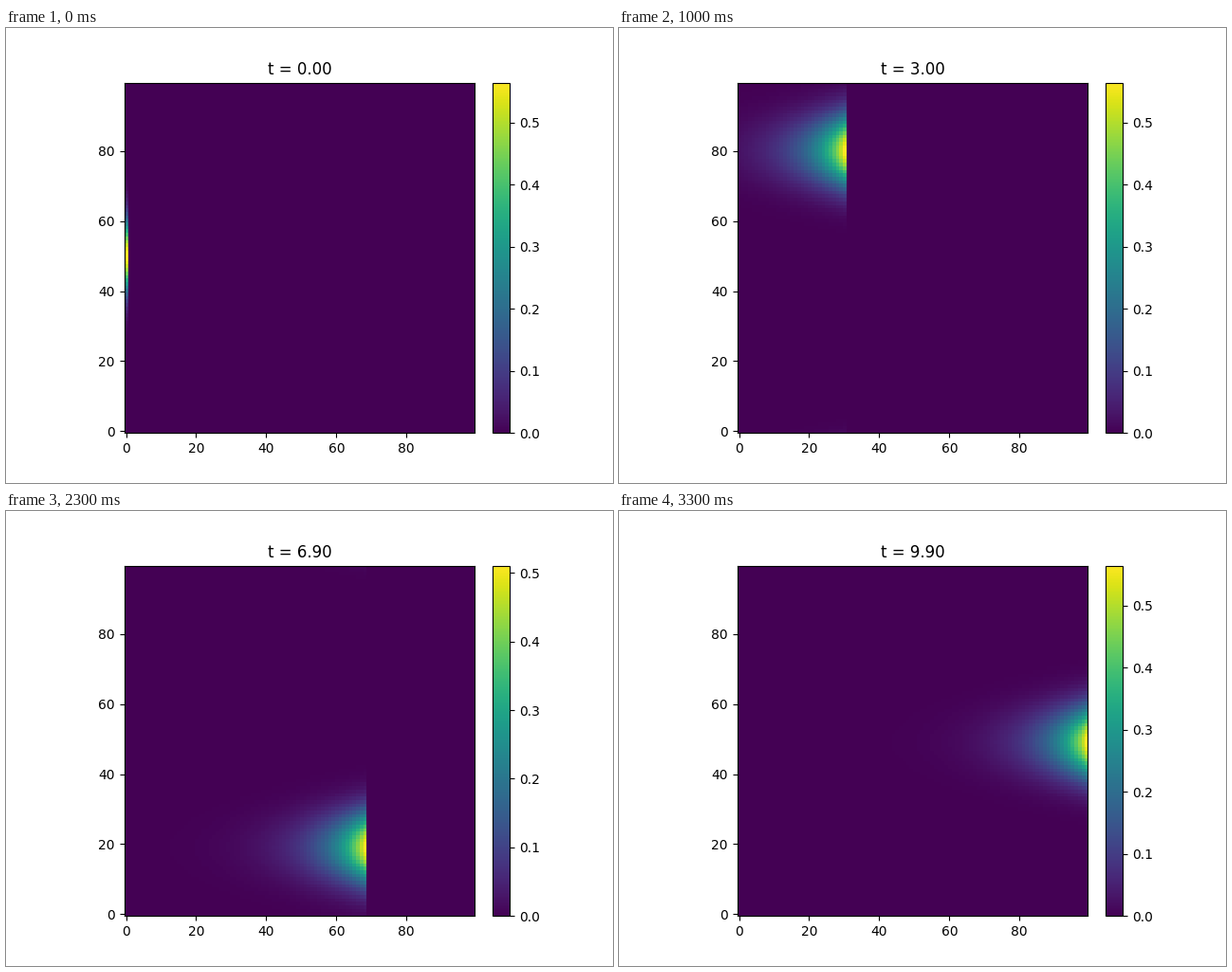
These frames come from a looping animation (640 by 480 pixels, 3400 ms). A matplotlib script:

```python
import numpy as np
import matplotlib.pyplot as plt
from matplotlib.animation import FuncAnimation
from mpl_toolkits.axes_grid1 import make_axes_locatable

SIZE = 10.0
N = 100
times = np.arange(0, SIZE, 0.3)
x = np.arange(N) * 0.1
y = x[:, None]


def density(t):
    """Gaussian drifting upwards (periodic), decaying behind a front at x = t."""
    dist = (y - SIZE / 2 - t + SIZE / 2) % SIZE - SIZE / 2
    tail = np.where(x <= t, np.exp(-np.abs(t - x)), 0)
    return np.exp(-dist**2) / np.sqrt(np.pi) * tail


fig, ax = plt.subplots(figsize=(6.4, 4.8), dpi=100)
cax = make_axes_locatable(ax).append_axes("right", size="5%", pad="5%")
im = ax.imshow(density(0), origin="lower", cmap="viridis")
fig.colorbar(im, cax=cax)
title = ax.set_title("t = 0.00")


def update(i):
    # Exact float comparison in density() makes the peak dip on some steps.
    data = density(times[i])
    im.set_data(data)
    im.set_clim(0, data.max())
    title.set_text(f"t = {times[i]:.2f}")
    return im, title


anim = FuncAnimation(fig, update, frames=len(times), interval=100, repeat=True,
                     repeat_delay=0, blit=False)
plt.show()
```
